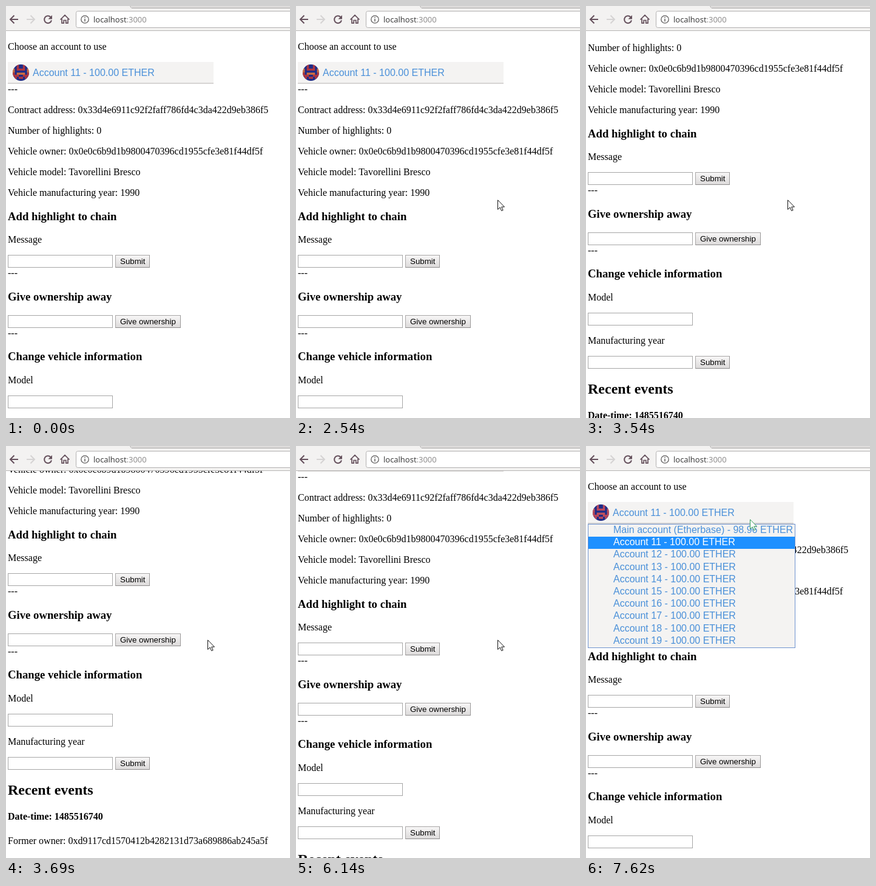
Write an HTML page that moves like this. It is 468 px wide and 677 px high and loops after 8 s.

```html
<!DOCTYPE html>
<html lang="en">
<head>
<meta charset="utf-8">
<title>Vehicle chain</title>
<style>
html, body { margin: 0; width: 100%; height: 100%; overflow: hidden; background: #fff; }
#stage { position: relative; width: 468px; height: 677px; overflow: hidden; }
#stage * { box-sizing: border-box; }
#page, #bar, #cursor { position: absolute; left: 0; top: 0; }
#page > * { position: absolute; left: 3px; margin: 0; white-space: nowrap; }
#page { width: 468px; color: #000; font: 16px/18px "Liberation Serif", "Times New Roman", serif; }
h2 { font: bold 24px/27px "Liberation Serif", serif; }
h3 { font: bold 18.72px/21px "Liberation Serif", serif; }
h4 { font: bold 16px/18px "Liberation Serif", serif; }
.field { width: 173px; height: 21px; border: 1px solid #a6a6a6; background: #fff; }
#page > .button {
  left: 180px; height: 21px; padding: 0 7px; border: 1px solid #a8a6a6; border-bottom-color: #8e8c8c; border-right-color: #9a9898;
  background: linear-gradient(#f7f6f6, #dddbdb); font: 13.333px/19px "Liberation Sans", Arial, sans-serif;
}
.account, .list { font: 16px/18px "Liberation Sans", Arial, sans-serif; color: #4a90d9; }
.account { top: 92px; width: 339px; height: 36px; padding: 9px 0 0 41px; background: #f4f3f2; border-bottom: 2px solid #d6d4d3; }
.account svg { position: absolute; left: 8px; top: 4px; }
.list { top: 128px; width: 342px; height: 204px; background: #f4f3f2; border: 1px solid #6f93cf; }
.list div { position: absolute; left: 0; width: 340px; height: 20px; padding-left: 41px; }
.list .on { background: #1e90ff; color: #fff; }
#bar { width: 468px; height: 41px; }
#bar text { font: 13px "Open Sans", "Noto Sans", sans-serif; }
</style>
</head>
<body>
<div id="stage">
  <div id="page"></div>
  <svg id="bar" viewBox="0 0 468 41">
    <path fill="#f3f2f1" d="M0 0H468V41H0Z"/>
    <path fill="#dddbda" d="M205 0H468V3H208Z"/>
    <path fill="none" stroke="#aaa8a8" d="M204.500 0L206 2.500Q206.500 3.500 208 3.500H468"/>
    <path stroke="#b6b4b4" d="M0 40.500H468"/>
    <rect x="115.500" y="8.500" width="370" height="27" rx="3" fill="#fff" stroke="#b3b1b1"/>
    <g fill="none" stroke="#65505c" stroke-width="2">
      <path id="back" d="M20 22H7.500M13.500 15.500L7 22L13.500 28.500"/>
      <path stroke="#d5d3d3" d="M34 22H46.500M40.500 15.500L47 22L40.500 28.500"/>
      <path d="M73.500 18A6 6 0 1 0 75 23.500"/>
      <path fill="#65505c" stroke="none" d="M76 15V21.500H69.500Z"/>
      <path stroke-width="1.700" d="M89.500 22.500L97 15L104.500 22.500M92 21V28.200H95.200V23.500H98.800V28.200H102V21"/>
    </g>
    <circle cx="130" cy="22" r="6.200" fill="none" stroke="#5c5a5a" stroke-width="1.300"/>
    <path stroke="#5c5a5a" stroke-width="1.500" d="M130 21V25.500M130 18V19.600"/>
    <text x="144" y="27" fill="#333">localhost<tspan fill="#8a8888">:3000</tspan></text>
  </svg>
  <svg id="cursor" width="13" height="20">
    <path fill="#fff" stroke="#111" d="M.5 .8V16.300L4.200 12.900L6.700 18.500L9.100 17.500L6.700 12.100H11.500Z"/>
  </svg>
</div>
<script>
const LOOP = 8000;
const page = document.getElementById('page');
const cursor = document.getElementById('cursor');
const arrow = cursor.firstElementChild;

function add(tag, top, text = '', cls = '') {
  const el = document.createElement(tag);
  el.className = cls;
  el.textContent = text;
  if (top !== null) el.style.top = top + 'px';
  page.append(el);
  return el;
}

[
  ['p', 58, 'Choose an account to use'],
  ['p', 128, '---'],
  ['p', 162, 'Contract address: 0x33d4e6911c92f2faff786fd4c3da422d9eb386f5'],
  ['p', 196, 'Number of highlights: 0'],
  ['p', 230, 'Vehicle owner: 0x0e0c6b9d1b9800470396cd1955cfe3e81f44df5f'],
  ['p', 264, 'Vehicle model: Tavorellini Bresco'],
  ['p', 298, 'Vehicle manufacturing year: 1990'],
  ['h3', 335, 'Add highlight to chain'],
  ['p', 375, 'Message'],
  ['p', 430, '---'],
  ['h3', 467, 'Give ownership away'],
  ['p', 529, '---'],
  ['h3', 565, 'Change vehicle information'],
  ['p', 606, 'Model'],
  ['p', 677, 'Manufacturing year'],
  ['h2', 752, 'Recent events'],
  ['h4', 800, 'Date-time: 1485516740'],
  ['p', 840, 'Former owner: 0xd9117cd1570412b4282131d73a689886ab245a5f']
].forEach(row => add(...row));

[[409, 'Submit'], [508, 'Give ownership'], [640], [711, 'Submit']].forEach(([top, label]) => {
  add('div', top, '', 'field');
  if (label) add('div', top, label, 'button');
});

// Identicon: left half of each row, mirrored
const ICON = ['..r.', '..r.', 'o.rr', 'o...', 'r.oo', 'rrr.', '.r.r', '....'];
function drawIcon(red, orange) {
  const cells = ICON.map((half, y) => [...half, ...[...half].reverse()].map((c, x) =>
    c === '.' ? '' : `<rect x="${x}" y="${y}" width="1.02" height="1.02" fill="${c === 'r' ? red : orange}"/>`
  ).join('')).join('');
  return `<svg width="27" height="27" viewBox="0 0 8 8" style="border-radius:50%;background:#1d2c88">${cells}</svg>`;
}
const account = add('div', null, 'Account 11 - 100.00 ETHER', 'account');
const icon = document.createElement('span');
account.append(icon);
const ICON_EARLY = drawIcon('#b5373d', '#d3713f');
const ICON_LATE = drawIcon('#c24a5a', '#c4525c');
let shownIcon = '';

const list = add('div', null, '', 'list');
for (let i = 0; i < 10; i++) {
  const item = document.createElement('div');
  item.textContent = i ? `Account ${10 + i} - 100.00 ETHER` : 'Main account (Etherbase) - 98.96 ETHER';
  item.style.top = Math.round(i * 20.2) + 'px';
  if (i === 1) item.className = 'on';
  list.append(item);
}

// [time, scroll offset]
const SCROLL = [
  [0, 0], [2770, 14], [2850, 50], [2920, 86], [3000, 100],
  [3540, 136], [3610, 186], [3690, 200],
  [5690, 164], [5770, 114], [5850, 100],
  [6140, 86], [6220, 50], [6300, 14], [6370, 0]
];

// Pointer moves: first step, last step, step count, start, bend, end
const MOVES = [
  [230, 1000, 11, [392, 672], [484, 437], [355, 281]],
  [1080, 1620, 8, [355, 281], [300, 212], [245, 144]],
  [1850, 2380, 8, [245, 144], [290, 231], [334, 318]],
  [2540, 2540, 1, [334, 318], [333, 318], [332, 318]],
  [6530, 7300, 11, [332, 318], [301, 219], [270, 121]],
  [7370, 7370, 1, [270, 121], [270, 120], [270, 120]]
];

const latest = (table, t) => table.filter(row => row[0] <= t).pop();

function pointerAt(t) {
  const move = latest(MOVES, t);
  if (!move) return null;
  const [first, last, count, a, b, c] = move;
  const gap = (last - first) / Math.max(1, count - 1);
  const step = gap ? Math.min(count, Math.floor((t - first) / gap + 1e-6) + 1) : count;
  const u = step / count;
  const s = u * u * (3 - 2 * u);
  return a.map((v, i) => Math.round((1 - s) ** 2 * v + 2 * s * (1 - s) * b[i] + s * s * c[i]));
}

function render(t) {
  page.style.transform = `translateY(${-latest(SCROLL, t)[1]}px)`;
  list.style.display = t >= 7620 ? 'block' : 'none';
  const wanted = t < 2770 ? ICON_EARLY : ICON_LATE;
  if (wanted !== shownIcon) icon.innerHTML = shownIcon = wanted;
  const pos = pointerAt(t);
  cursor.style.display = pos ? 'block' : 'none';
  if (pos) cursor.style.transform = `translate(${pos[0]}px, ${pos[1]}px)`;
  arrow.setAttribute('stroke', t >= 7370 ? '#2f9a58' : '#111');
}

const start = performance.now();
function tick() {
  render((performance.now() - start) % LOOP);
  requestAnimationFrame(tick);
}
tick();
</script>
</body>
</html>
```
